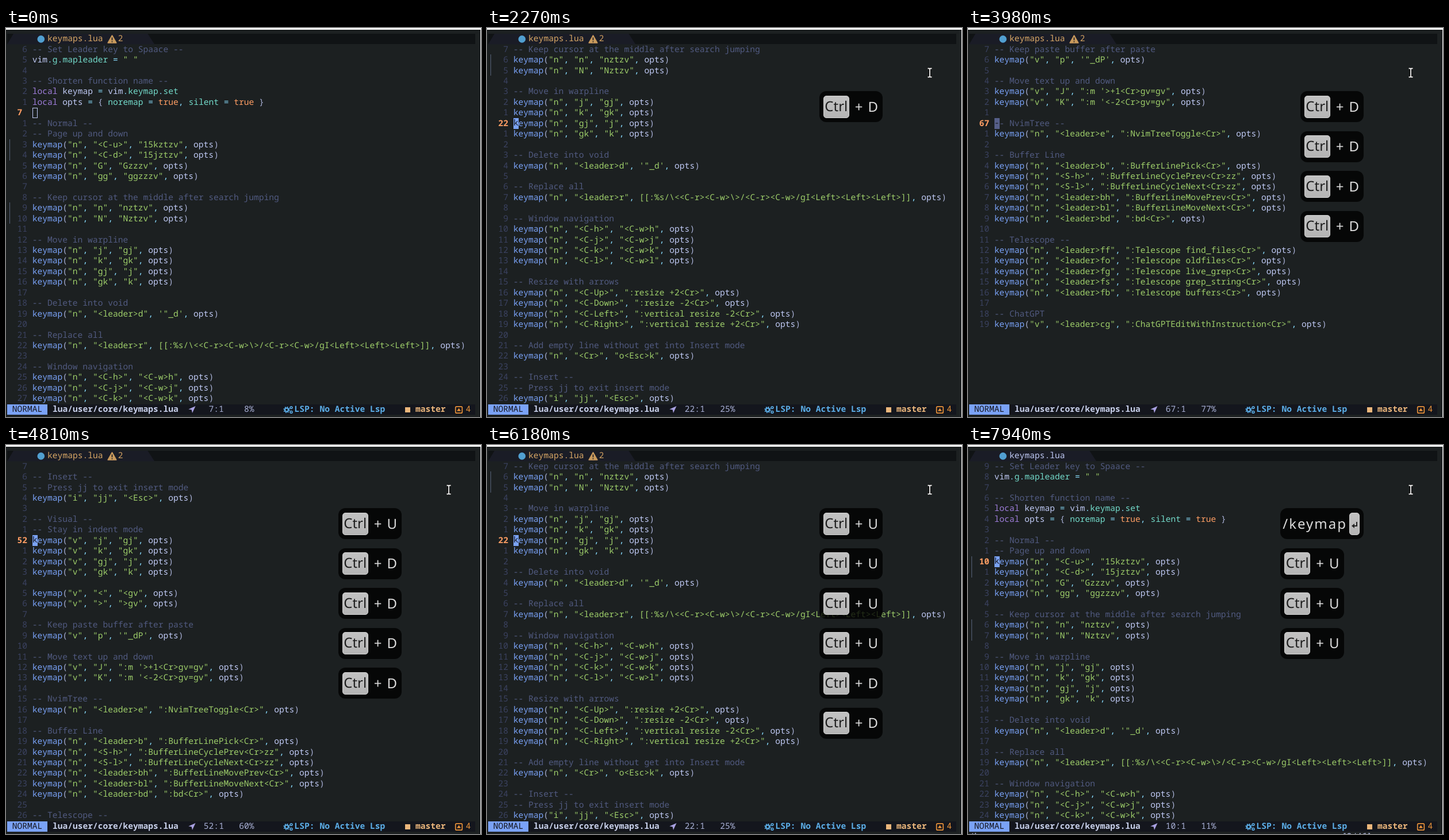
An HTML page that plays this animation: 826 px wide and 678 px high, repeating every 8 s.

```html
<!DOCTYPE html>
<html lang="en">
<head>
<meta charset="utf-8">
<title>Editor key maps</title>
<style>
html, body { margin: 0; width: 100%; height: 100%; overflow: hidden; }
body {
  --cw: 8.765px; --lh: 18.45px; --bg: #1c2021;
  position: relative; background: var(--bg); color: #c0caf5;
  font: 450 14.608px/18.45px "Noto Sans Mono", "DejaVu Sans Mono", monospace;
  font-variant-ligatures: none; text-rendering: geometricPrecision; white-space: pre;
}
body > *, #bar > *, #status > * { position: absolute; }
#top { left: 0; top: 0; width: 826px; height: 3px; background: #fff; }
#edge { left: 825px; top: 0; width: 1px; height: 678px; background: #fff; }
#bar { left: 2px; top: 9.8px; width: 813.5px; height: var(--lh); background: #101315; }
#bar > *, #status > * { top: 0; }
#bar svg, #status svg { left: 0; overflow: visible; }
#bar span, #status span { line-height: 17.4px; }
#tab { fill: #1a1c26; }
#name { left: calc(8 * var(--cw)); }
#count { left: calc(22 * var(--cw)); color: #d0a060; }
.warn #name { color: #d9a866; }
#bar:not(.warn) .w, #bar:not(.warn) #count { display: none; }
#rows { left: 2px; top: 27.7px; }
.row { height: var(--lh); color: #3b4261; position: relative; }
.row.sign::before { content: ""; position: absolute; left: 3.6px; top: 0; width: 1px; height: 18.6px; background: #566178; }
.row b { color: #ff9e64; }
.row i { font-style: normal; color: #c0caf5; }
.row .com { color: #515a80; }
.row .str { color: #9ece6a; }
.row .key { color: #9d7cd8; }
.row .bool { color: #ff9e64; }
.row .op { color: #89ddff; }
.row .br { color: #a9b1d6; }
.row .fn { color: #7aa2f7; }
.row .field { color: #73daca; }
#cursor { left: 45.8px; height: var(--lh); color: #16181c; box-sizing: border-box; line-height: 17.3px; }
#status { left: 2px; top: 655.6px; width: 813.5px; height: var(--lh); background: #14161d; }
#mode { left: 0; height: var(--lh); color: #16161e; }
#path, #lsp, #branch { font-weight: 700; }
#path { color: #c8d0ea; }
#pos, #pct { color: #a9b1d6; text-align: right; width: 60px; }
#lsp { left: calc(57 * var(--cw)); color: #5caee8; }
#branch { left: calc(81 * var(--cw)); color: #ecb77c; }
#errs { left: calc(91 * var(--cw)); color: #e8923a; }
#cmd { left: 2px; top: 672.6px; }
#mouse { left: -6px; top: -9px; overflow: visible; }
#keys {
  right: 138px; top: 110px; display: flex; flex-direction: column; align-items: flex-start; gap: 15.5px;
  font: 24px/39px "Noto Sans", "Open Sans", sans-serif; color: #dcdcdc;
}
.tag { display: flex; align-items: center; box-sizing: border-box; background: rgba(0, 0, 0, .78); border-radius: 12px; }
.combo { height: 54px; padding: 0 8px 0 7px; }
.combo span { margin: 0 9px 0 10px; }
.cap { height: 37px; line-height: 36px; padding: 0 1.5px; color: #1c1c1c; border-radius: 5px; border: 1px solid #d2d2d2; background: linear-gradient(#c2c2c2, #b4b4b4); }
.typed { height: 41px; padding: 0 4px; letter-spacing: 2px; }
.typed.done { height: 54px; padding-right: 7px; }
.done .cap { margin-left: 4px; padding: 0; width: 16px; }
</style>
</head>
<body>
<div id="bar">
  <svg width="1" height="1">
    <path id="tab"/>
    <circle cx="58.8" cy="9.4" r="6.3" fill="#519fd0"/>
    <g class="w">
      <path d="M182.5 3 L189.8 16 H175.2Z" fill="#c99a5c" stroke="#c99a5c" stroke-width="1.6" stroke-linejoin="round"/>
      <path d="M182.5 6.5 V11.5 M182.5 13 V14.8" stroke="#1a1c26" stroke-width="1.7"/>
    </g>
  </svg>
  <span id="name">keymaps.lua</span><span id="count">2</span>
</div>
<div id="rows"></div>
<div id="cursor"></div>
<div id="status">
  <span id="mode"></span><span id="path">lua/user/core/keymaps.lua</span>
  <svg id="arrow" width="1" height="1"><path d="M327.5 3 L322 15 L320.8 9.6 L315.3 8.6Z" fill="#a9a1e1"/></svg>
  <span id="pos"></span><span id="pct"></span>
  <svg width="1" height="1">
    <g fill="none" stroke="#5caee8">
      <circle cx="486" cy="9.5" r="3" stroke-width="2.2"/>
      <circle cx="486" cy="9.5" r="4.8" stroke-width="1.8" stroke-dasharray="1.9 1.87"/>
      <circle cx="494" cy="5.6" r="1.9" stroke-width="1.6"/>
      <circle cx="494" cy="13.4" r="1.9" stroke-width="1.6"/>
    </g>
    <rect x="692" y="5" width="9" height="9" fill="#ecb77c"/>
    <rect x="779.7" y="3.8" width="11.6" height="11.4" rx="2" fill="none" stroke="#e8923a" stroke-width="1.7"/>
    <path d="M785.5 6.6 L789 11.8 H782Z" fill="#e8923a"/>
  </svg>
  <span id="lsp">LSP: No Active Lsp</span><span id="branch">master</span><span id="errs">4</span>
</div>
<div id="cmd"></div>
<svg id="mouse" width="12" height="18">
  <g fill="none"><path d="M2.5 1.5 H5 L6 2.5 L7 1.5 H9.5 M6 2.5 V15.5 M2.5 16.5 H5 L6 15.5 L7 16.5 H9.5" stroke="#000" stroke-width="3.6"/>
  <path d="M2.5 1.5 H5 L6 2.5 L7 1.5 H9.5 M6 2.5 V15.5 M2.5 16.5 H5 L6 15.5 L7 16.5 H9.5" stroke="#f4f4f4" stroke-width="1.8"/></g>
</svg>
<div id="keys"></div>
<div id="top"></div><div id="edge"></div>
<script>
// "mode|left|right" is shorthand for a keymap() call
const lines = String.raw`-- Set Leader key to Spaace --
vim.g.mapleader = " "

-- Shorten function name --
local keymap = vim.keymap.set
local opts = { noremap = true, silent = true }

-- Normal --
-- Page up and down
n|<C-u>|15kztzv
n|<C-d>|15jztzv
n|G|Gzzzv
n|gg|ggzzzv

-- Keep cursor at the middle after search jumping
n|n|nztzv
n|N|Nztzv

-- Move in warpline
n|j|gj
n|k|gk
n|gj|j
n|gk|k

-- Delete into void
n|<leader>d|'"_d'

-- Replace all
n|<leader>r|[[:%s/\<<C-r><C-w>\>/<C-r><C-w>/gI<Left><Left><Left>]]

-- Window navigation
n|<C-h>|<C-w>h
n|<C-j>|<C-w>j
n|<C-k>|<C-w>k
n|<C-l>|<C-w>l

-- Resize with arrows
n|<C-Up>|:resize +2<Cr>
n|<C-Down>|:resize -2<Cr>
n|<C-Left>|:vertical resize -2<Cr>
n|<C-Right>|:vertical resize +2<Cr>

-- Add empty line without get into Insert mode
n|<Cr>|o<Esc>k

-- Insert --
-- Press jj to exit insert mode
i|jj|<Esc>

-- Visual --
-- Stay in indent mode
v|j|gj
v|k|gk
v|gj|j
v|gk|k

v|<|<gv
v|>|>gv

-- Keep paste buffer after paste
v|p|'"_dP'

-- Move text up and down
v|J|:m '>+1<Cr>gv=gv
v|K|:m '<-2<Cr>gv=gv

-- NvimTree --
n|<leader>e|:NvimTreeToggle<Cr>

-- Buffer Line
n|<leader>b|:BufferLinePick<Cr>
n|<S-h>|:BufferLineCyclePrev<Cr>zz
n|<S-l>|:BufferLineCycleNext<Cr>zz
n|<leader>bh|:BufferLineMovePrev<Cr>
n|<leader>bl|:BufferLineMoveNext<Cr>
n|<leader>bd|:bd<Cr>

-- Telescope --
n|<leader>ff|:Telescope find_files<Cr>
n|<leader>fo|:Telescope oldfiles<Cr>
n|<leader>fg|:Telescope live_grep<Cr>
n|<leader>fs|:Telescope grep_string<Cr>
n|<leader>fb|:Telescope buffers<Cr>

-- ChatGPT
v|<leader>cg|:ChatGPTEditWithInstruction<Cr>`.split("\n").map(expand);

function expand(line) {
  const m = line.match(/^([niv])\|(.+?)\|(.+)$/);
  if (!m) return line;
  const right = /^('"|\[\[)/.test(m[3]) ? m[3] : `"${m[3]}"`;
  return `keymap("${m[1]}", "${m[2]}", ${right}, opts)`;
}

const esc = s => s.replace(/&/g, "&amp;").replace(/</g, "&lt;");
const kinds = ["com", "str", "key", "bool", "fn", "field", "op", "br", "var"];
const token = /(--.*)|("[^"]*"|'[^']*'|\[\[.*\]\])|(\blocal\b)|(\btrue\b)|(keymap(?=\())|((?<=\.)\w+|noremap|silent)|([=,.])|([(){}])|(\w+)/g;
const paint = line => line.replace(token, (all, ...g) => {
  const kind = kinds[g.slice(0, 9).findIndex(x => x !== undefined)];
  return `<i class="${kind}">${esc(all)}</i>`;
});
const painted = lines.map(paint);

const LOOP = 8000, ROWS = 34, LH = 18.45, CW = 8.765;
const signed = [10, 11, 16, 17];
// [time, cursor line]
const jumps = [[0, 7], [2270, 22], [3010, 37], [3510, 52], [3980, 67], [4810, 52], [5380, 37], [5870, 22], [6260, 7], [7070, 10]];
const presses = [[2270, "D"], [2920, "D"], [3510, "D"], [3980, "D"], [4720, "U"], [5290, "U"], [5780, "U"], [6180, "U"]];
const typing = [[6820, "/"], [6990, "/k"], [7150, "/ke"], [7220, "/key"], [7530, "/keym"], [7610, "/keyma"], [7690, "/keymap"]];
const matches = [[0, 0], [7070, 1], [7220, 2], [7290, 3], [7610, 4], [7690, 5], [7770, 6], [7940, 0]];
const moves = [[0, null], [250, [621, 534]], [330, [700, 310]], [410, [759, 140]], [670, [764, 128]], [745, [775, 102]],
  [820, [782, 84]], [895, [778, 79]], [970, [772, 78]], [1040, [769, 77]], [1210, [770, 78]]];
const COMMAND = 6820, ENTER = 7850, NORMAL = 7940, FOCUS = 1780, HOLD = 2920, FADE = 150;

const $ = id => document.getElementById(id);
const at = (list, t) => list.reduce((v, [time, x]) => t >= time ? x : v, undefined);
const left = (id, col) => $(id).style.left = col * CW + "px";
let shown = "", tags = "";

// Fills the rows and returns the top of the cursor line
function drawRows(cur) {
  const first = cur === 10 ? 1 : Math.max(1, cur - 7);
  let html = "";
  for (let n = first; n < first + ROWS && n <= lines.length; n++) {
    const num = n === cur ? `  <b>${String(n).padEnd(2)}</b>` : String(Math.abs(n - cur)).padStart(4);
    html += `<div class="row${signed.includes(n) ? " sign" : ""}">${num} ${painted[n - 1]}</div>`;
  }
  $("rows").innerHTML = html;
  return (cur - first) * LH + 28.3;
}

function drawCursor(y, cur, hits, hollow, hidden) {
  const s = $("cursor").style, line = lines[cur - 1], size = Math.max(1, hits);
  const color = hits ? "#ff9e64" : line.startsWith("--") ? "#565f89" : line.startsWith("keymap") ? "#7aa2f7" : "#c0caf5";
  s.display = hidden ? "none" : "";
  s.top = y + "px";
  s.width = size * CW + "px";
  s.background = hollow ? "none" : color;
  s.border = hollow ? "1px solid #c0caf5" : "none";
  $("cursor").textContent = line.slice(0, size);
}

function drawScreen(t) {
  const cur = at(jumps, t), hits = at(matches, t);
  const command = t >= COMMAND && t < NORMAL, hollow = t < FOCUS, warn = t < COMMAND;
  const state = [cur, hits, command, hollow, warn].join();
  if (state === shown) return;
  shown = state;
  drawCursor(drawRows(cur), cur, hits, hollow, command && !hits);

  const shift = command ? 1 : 0, line = command ? 7 : cur;
  $("mode").textContent = command ? " COMMAND " : " NORMAL ";
  $("mode").style.background = command ? "#e0af68" : "#7aa2f7";
  left("path", 9 + shift);
  left("arrow", shift);
  left("pos", 43 + shift - 60 / CW);
  left("pct", 49 + shift - 60 / CW);
  $("pos").textContent = line + ":1";
  $("pct").textContent = Math.floor(line / lines.length * 100) + "%";

  $("bar").className = warn ? "warn" : "";
  const end = (warn ? 28 : 24) * CW;
  $("tab").setAttribute("d", `M0 18.45 L11 0 H${end - 1} L${end + 11} 18.45Z`);
  const query = "/" + "keymap".slice(0, hits);
  $("cmd").textContent = command ? query : t >= NORMAL ? "/keymap".padEnd(74) + "[3/46]" : "";
}

function drawKeys(t) {
  let html = "";
  const word = at(typing, t), done = t >= ENTER;
  const enter = `<div class="cap"><svg width="16" height="37"><path d="M12 15 V22 H6" fill="none" stroke="#222" stroke-width="2"/><path d="M3 22 L8 18 V26Z" fill="#222"/></svg></div>`;
  if (word) html = `<div class="tag typed${done ? " done" : ""}">${word}${done ? enter : ""}</div>`;
  for (const [time, key] of [...presses].reverse()) {
    const age = t - time;
    if (age < 0 || age >= HOLD + FADE) continue;
    const alpha = Math.min(1, 1 - (age - HOLD) / FADE).toFixed(2);
    html += `<div class="tag combo" style="opacity:${alpha}"><div class="cap">Ctrl</div><span>+</span>${key}</div>`;
  }
  if (html !== tags) $("keys").innerHTML = tags = html;
}

function drawMouse(t) {
  const p = at(moves, t);
  $("mouse").style.display = p ? "" : "none";
  if (p) $("mouse").style.transform = `translate(${p[0]}px, ${p[1]}px)`;
}

const start = performance.now();
function tick() {
  const t = (performance.now() - start) % LOOP;
  drawScreen(t);
  drawKeys(t);
  drawMouse(t);
  requestAnimationFrame(tick);
}
tick();
</script>
</body>
</html>
```
